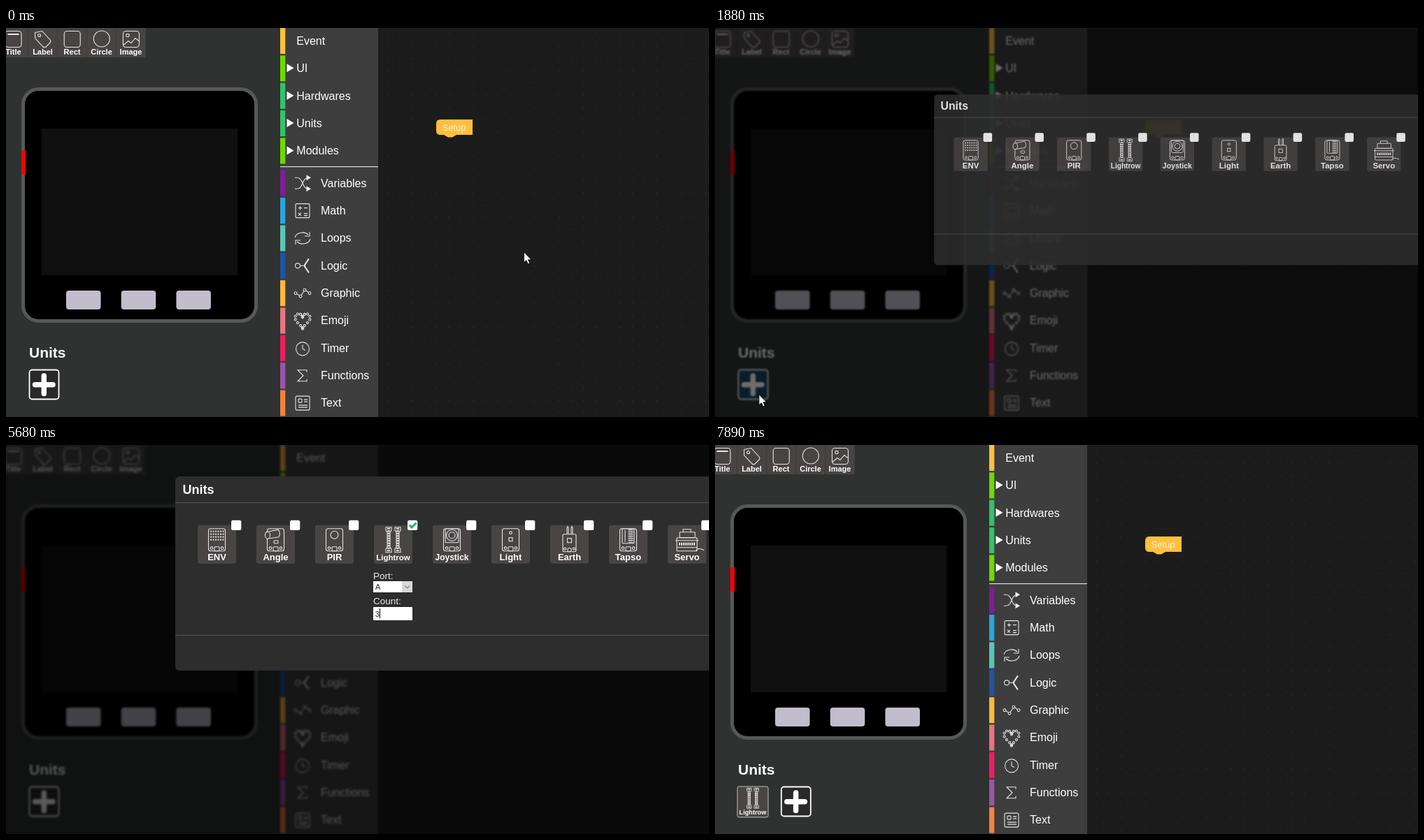
Write an HTML page that moves like this. It is 1005 px wide and 557 px high and loops after 8 s.

```html
<!DOCTYPE html>
<html lang="en">
<head>
<meta charset="utf-8">
<title>Block editor</title>
<style>
html, body { margin: 0; width: 100%; height: 100%; overflow: hidden; background: #0a0a0a; }
svg { display: block; width: 100%; height: 100%; font-family: "Liberation Sans", Arial, sans-serif; }
.line { fill: none; stroke: #e4e4e4; stroke-width: 1.1; }
</style>
</head>
<body>
<svg id="stage" viewBox="0 0 1005 557"></svg>
<script>
const LOOP = 8000, STEP = 120, FADE = 313;
// Runs of screen updates: [start, number of steps]
const RUNS = [[0, 1], [500, 1], [640, 7], [1640, 5], [2370, 2], [2640, 4], [3150, 3],
  [3790, 5], [4550, 2], [5680, 3], [6420, 1], [6670, 3], [7530, 4]];
// Pointer path: [time, x, y]
const PATH = [[0, 740.5, 321], [500, 736, 326], [640, 690, 352], [880, 430, 440], [1120, 150, 518],
  [1240, 66, 529], [1360, 63, 525], [2250, 63, 525], [2370, 110, 512], [2490, 276, 460],
  [2640, 416, 286], [2760, 500, 210], [2880, 545, 160], [3000, 554, 145], [3150, 576, 112],
  [3270, 576, 112], [3390, 562, 131], [3910, 544, 190], [4030, 550, 260], [4150, 562.5, 245],
  [4270, 562.5, 240], [4550, 471, 240.5], [5800, 471, 240.5], [5920, 470.5, 240],
  [6420, 470.5, 240], [6670, 570, 270], [6790, 783, 343]];

const rect = (x, y, w, h, fill, r = 0, more = '') =>
  `<rect x="${x}" y="${y}" width="${w}" height="${h}" fill="${fill}" rx="${r}" ${more}/>`;
const circle = (x, y, r, more = '') => `<circle cx="${x}" cy="${y}" r="${r}" ${more}/>`;
const path = (d, more = '') => `<path d="${d}" ${more}/>`;
const text = (x, y, s, size, more = '') =>
  `<text x="${x}" y="${y}" font-size="${size}" fill="#fff" ${more}>${s}</text>`;
const group = (x, y, body, more = '') => `<g transform="translate(${x} ${y})" ${more}>${body}</g>`;
const box = (x, y, w, h, r) => rect(x, y, w, h, 'none', r);
const BOLD = 'font-weight="700"', MID = BOLD + ' text-anchor="middle"', LINE = 'class="line"';
const TILE = '#494545';

function toolbar() {
  const tools = [
    ['Title', box(-11.5, -11, 23, 23, 4) + path('M-8-6.5H8', 'stroke-width="2"')],
    ['Label', path('M-11-9L-1-11 11 2Q12 4 10 6L4 12Q2 13 0 11L-11-1Z') + circle(-5, -5, 2)],
    ['Rect', box(-11.5, -11, 23, 23, 4)],
    ['Circle', circle(0, 0, 11.5)],
    ['Image', box(-11.5, -11, 23, 23, 4) + circle(-5, -5, 2.2) + path('M-11 9L-4 3 0 6 6-1 11 3')]
  ];
  return tools.map(([name, icon], i) =>
    rect(-10 + 42 * i, 0, 41.5, 42, '#484444') +
    group(10.5 + 42.1 * i, 15.5, icon, LINE) +
    text(10.5 + 42 * i, 38.3, name, 11, MID)).join('');
}

function device() {
  return rect(24.5, 87.5, 333, 332, '#000', 22, 'stroke="#585858" stroke-width="5"') +
    rect(51, 144, 280, 210, '#101010') + rect(22, 175, 6, 35, '#f00') +
    [86, 164.7, 243.4].map(x => rect(x, 376, 49.5, 27, '#c1bdcc', 4)).join('') +
    text(33, 472, 'Units', 21, BOLD);
}

function heart() {
  let s = '';
  for (let i = 0; i < 18; i++) {
    const a = i / 18 * 2 * Math.PI;
    const y = 13 * Math.cos(a) - 5 * Math.cos(2 * a) - 2 * Math.cos(3 * a) - Math.cos(4 * a);
    s += circle(10.8 * Math.sin(a) ** 3, -y * .74 - 1, 1.5);
  }
  return s;
}

function sidebar() {
  const menus = [['Event', '#ffbf3f'], ['UI', '#6fd900'], ['Hardwares', '#33c26b'],
    ['Units', '#33c26b'], ['Modules', '#6fd900']];
  const blocks = [
    ['Variables', '#7f1d9b', path('M-11-8H-8C1-8-1 8 8 8M-11 8H-8C1 8-1-8 8-8') +
      path('M6-11L11-8 6-5ZM6 5L11 8 6 11Z', 'fill="#fff"')],
    ['Math', '#2ba6de', box(-10, -10, 20, 20, 2) + path('M-6-4H-1M-3.5-6.5V-1.5M2-4H7M-6 3L-2 7M-2 3L-6 7M2 4H7M2 7H7')],
    ['Loops', '#58c7b8', path('M-11-1A11 9 0 0 1 8-5M10-9V-3H3M11 1A11 9 0 0 1-8 5M-10 9V3H-3')],
    ['Logic', '#1f549f', circle(-7, 0, 3.5) + path('M-3 0H3') + path('M9-10L3-1V1L9 10', 'stroke-width="2"')],
    ['Graphic', '#ffb93b', path('M-8 1L-5 3M-2 3L2-3M5-4L8-1') + circle(-10, 0, 1.9) + circle(-3, 4.5, 1.9) +
      circle(3, -4.5, 1.9) + circle(10, 0, 1.9)],
    ['Emoji', '#e97580', heart()],
    ['Timer', '#ee1f5f', circle(0, 1, 9.5) + path('M0-5V1L4 3')],
    ['Functions', '#9a55a8', path('M6-5V-8H-7L1 0-7 8H6V5')],
    ['Text', '#f5813f', box(-10, -10, 20, 20, 2) + box(-6, -6, 5, 5, 1) + path('M2-5H7M2-2H7M-6 3H7M-6 6H7')]
  ];
  return rect(392, -10, 140, 580, '#3e3e3e') + rect(392, 198, 140, 1.2, '#ddd') +
    menus.map(([name, color], i) => group(392, 39.35 * i,
      rect(0, 0, 7.3, 37, color) + text(23.3, 24, name, 16) +
      (i ? path('M9.5 12V24L19.5 18Z', 'fill="#fff"') : ''))).join('') +
    blocks.map(([name, color, icon], i) => group(392, 203.8 + 39.35 * i,
      rect(0, 0, 7.3, 37, color) + text(58, 23.8, name, 16) +
      group(32, 18.5, icon, LINE))).join('');
}

function workspace() {
  return `<pattern id="dots" x="545" y="8" width="17.5" height="17.5" patternUnits="userSpaceOnUse">
    ${rect(0, 0, 1, 1, '#3a3a3a')}</pattern>` +
    rect(532, -10, 490, 580, '#1c1c1c') + rect(532, 0, 473, 557, 'url(#dots)') +
    path('M621 131H667V153H644L638 156.5H632L626 153H621Q615 153 615 147V137Q615 131 621 131Z', 'fill="#ffbf3f"') +
    text(623.5, 147, 'Setup', 13, 'fill-opacity=".8"');
}

// Small module pictures in a 55 by 55 tile
const board = box(15.5, 5, 24, 32, 3) + circle(20, 33, 1.8) + circle(35, 33, 1.8) + box(24, 31, 7, 6, 1);
const strip = x => path(`M${x} 3H${x + 8}V8L${x + 6} 10V32L${x + 8} 34V39H${x}V34L${x + 2} 32V10L${x} 8Z`) +
  path(`M${x + 4} 4V39`, 'stroke-width="4" stroke-dasharray="2 1.5"');
const units = [
  ['ENV', board + path('M19 9H37M19 13H37M19 17H37M19 21H37',
    'stroke-width="2.2" stroke-linecap="round" stroke-dasharray="0 3.5"')],
  ['Angle', board + path('M14 10L31 6.5Q35 11 32 17L16 19.5Z', `fill="${TILE}"`) +
    `<ellipse cx="16" cy="14.5" rx="3.6" ry="5" fill="${TILE}"/>` + box(25, 22, 6, 4, 1)],
  ['PIR', board + circle(27.5, 14, 5.5)],
  ['Lightrow', strip(17) + strip(30)],
  ['Joystick', board + box(18, 5, 19, 20, 2) + circle(27.5, 14.5, 8) + circle(27.5, 14.5, 4.5)],
  ['Light', board + circle(27.5, 11, 1.8) + box(25, 18, 5, 5, 0)],
  ['Earth', box(18, 13, 19, 25, 2) + path('M24 13V4L25 2 26 4V13M30 13V4L31 2 32 4V13') +
    box(24.5, 19, 6, 6, 0) + circle(21, 34, 1.6) + circle(34, 34, 1.6) + box(25, 33, 5, 5, 1)],
  ['Tapso', board + box(19, 5, 17, 21, 1) + path('M31 6V25', 'stroke-width="7" stroke-dasharray="1.5 1.5"') + path('M23 7V24')],
  ['Servo', box(13, 18, 29, 19, 1) + box(17, 10, 22, 8, 1) + path('M11 22H44M13 32H42M22 10V6H33V10M40 37Q43 31 52 36') +
    path('M16 27H39', 'stroke-width="4" stroke-dasharray="2 1"')],
  ['Weigh'], ['Relay'], ['Motion']
];
const tile = ([name, icon]) => rect(0, 0, 55, 55, TILE, 3) +
  (icon ? `<g ${LINE}>${icon}</g>` : '') +
  text(27.5, icon ? 50.3 : 32, name, name.length < 7 ? 13 : name === 'Joystick' ? 12 : 11.5, MID);

function modal() {
  return rect(242, 45, 1178, 278, '#2d2d2d', 6) + text(252.5, 70, 'Units', 18, BOLD) +
    rect(242, 82, 1178, 1, '#555') + rect(242, 272, 1178, 1, '#555') +
    units.map((u, i) => group(274 + 84 * i, 114.7, tile(u) + rect(48, -7, 14.3, 14.3, '#fff', 2.5))).join('') +
    rect(1258, 280, 82, 31, '#d9412f', 3) + text(1299, 301, 'Cancel', 16, 'text-anchor="middle"') +
    rect(1353, 280, 50, 31, '#1fa35a', 3) + text(1378, 301, 'OK', 16, 'text-anchor="middle"') +
    path('M576.5 114.5L580 118 586.5 111.5', 'id="check" fill="none" stroke="#1fb45a" stroke-width="2.8"') +
    `<g id="form">${text(525, 191.5, 'Port:', 13.5, 'fill-opacity=".9"')}
    ${text(525, 228, 'Count:', 13.5, 'fill-opacity=".9"')}
    ${rect(525, 195, 56, 16, '#fff')}${rect(566, 195, 15, 16, '#d8d8d8')}
    ${path('M570 201.5L573.5 205 577 201.5', 'fill="none" stroke="#444"')}
    <text x="528" y="207" font-size="11" fill="#222">A</text>
    ${rect(525, 232, 56, 19, '#fff', 1)}${rect(528, 234, 12.5, 14, '#3390ff', 0, 'id="select"')}
    <text id="count" x="527.8" y="246" font-size="11"></text>
    ${rect(540, 234, 1, 14, '#000', 0, 'id="caret"')}</g>`;
}

const plus = `<g id="plus">${rect(33.5, 489.5, 42, 42, '#292929', 4, 'stroke="#fff" stroke-width="1.8"')}
  ${rect(34.4, 490.4, 40.2, 40.2, '#0d5a8e', 3, 'id="hover"')}
  ${path('M54.3 498V523.5M41.5 510.7H67', 'stroke="#fff" stroke-width="7.5" stroke-linecap="round"')}</g>`;

const pointers = {
  arrow: path('M0 0V14.6L3.4 11.6 5.7 16.8 8.1 15.8 5.9 10.7H10.4Z', 'fill="#fff" stroke="#000" stroke-width=".7"'),
  beam: circle(0, 0, 8.8, 'id="halo" fill="none" stroke="#000" stroke-width="1.2"') +
    path('M-2.5-7.5H2.5M0-7.5V7.5M-2.5 7.5H2.5', 'id="bar" stroke-width="1.2"'),
  hand: path('M-1.5 1Q0-1 1.5 1V7L8 8.5Q10 9 9.5 12L8 19H0L-5 12Q-5 9-1.5 12Z', 'fill="#fff" stroke="#000" stroke-width=".8"')
};

document.getElementById('stage').innerHTML =
  `<g id="page">${rect(-10, -10, 402, 580, '#2f3231')}${toolbar()}${device()}${workspace()}${sidebar()}
  ${group(32, 489, `<g transform="scale(.8)">${tile(units[3])}${rect(0, 0, 55, 55, 'none', 3, 'stroke="#ddd"')}</g>`, 'id="added"')}
  ${plus}${rect(-10, -12, 1030, 12, '#1d5a8c')}</g>` +
  rect(0, 0, 1005, 557, '#000', 0, 'id="dim"') + `<g id="modal">${modal()}</g><g id="pointer">` +
  Object.entries(pointers).map(([k, v]) => `<g id="${k}">${v}</g>`).join('') + '</g>';

const el = {};
document.querySelectorAll('[id]').forEach(e => el[e.id] = e);
const show = (id, on) => el[id].setAttribute('visibility', on ? 'inherit' : 'hidden');
const set = (id, name, value) => el[id].setAttribute(name, value);

// Cubic curve (.25, .1) (.25, 1)
function ease(x) {
  if (x <= 0 || x >= 1) return x <= 0 ? 0 : 1;
  const curve = (u, a, b) => 3 * a * u * (1 - u) ** 2 + 3 * b * u * u * (1 - u) + u ** 3;
  let lo = 0, hi = 1;
  for (let i = 0; i < 24; i++) {
    const mid = (lo + hi) / 2;
    if (curve(mid, .25, .25) < x) lo = mid; else hi = mid;
  }
  return curve(lo, .1, 1);
}

function snap(t) {
  const [start, count] = RUNS.findLast(r => r[0] <= t);
  return start + STEP * Math.min(count - 1, Math.floor((t - start) / STEP));
}

function pointerAt(t) {
  const i = PATH.findLastIndex(k => k[0] <= t), a = PATH[i], b = PATH[i + 1] || a;
  const f = a === b ? 0 : (t - a[0]) / (b[0] - a[0]);
  return [a[1] + (b[1] - a[1]) * f, a[2] + (b[2] - a[2]) * f];
}

function draw(now) {
  const t = snap(now % LOOP);
  const p = ease((t - 1695) / FADE) - ease((t - 7500) / FADE);
  el.page.style.filter = p > .4 ? `blur(${1.5 * p}px)` : 'none';
  set('dim', 'opacity', .65 * p);
  set('modal', 'opacity', p);
  set('modal', 'transform', `translate(831 460) scale(${p}) translate(-831 -460)`);
  show('modal', p > 0);

  const done = t >= 7530;
  show('added', done);
  set('plus', 'transform', `translate(${done ? 61.3 : 0} 0)`);
  show('hover', t >= 1240 && t < 2000);
  set('hover', 'opacity', 1 - .6 * p * p);

  show('check', t >= 3270);
  show('form', t >= 3390);
  const selected = t >= 4550 && t < 5680;
  show('select', selected);
  set('count', 'fill', selected ? '#fff' : '#222');
  el.count.textContent = t < 5680 ? '10' : t < 5800 ? '3' : '30';
  set('caret', 'x', t === 5680 ? 534 : 540);
  show('caret', t >= 4270 && !selected && (t < 6420 || t >= 6910));

  const kind = t < 4150 ? 'arrow' : t < 5680 ? 'beam' : t < 5920 ? '' : t < 6670 ? 'hand' : t < 6910 ? 'arrow' : '';
  for (const k in pointers) show(k, k === kind);
  show('halo', kind === 'beam' && t >= 4270 && t < 4670);
  set('bar', 'stroke', t < 4550 ? '#000' : '#fff');
  set('pointer', 'transform', `translate(${pointerAt(t)})`);
  requestAnimationFrame(() => draw(performance.now()));
}
draw(performance.now());
</script>
</body>
</html>
```
